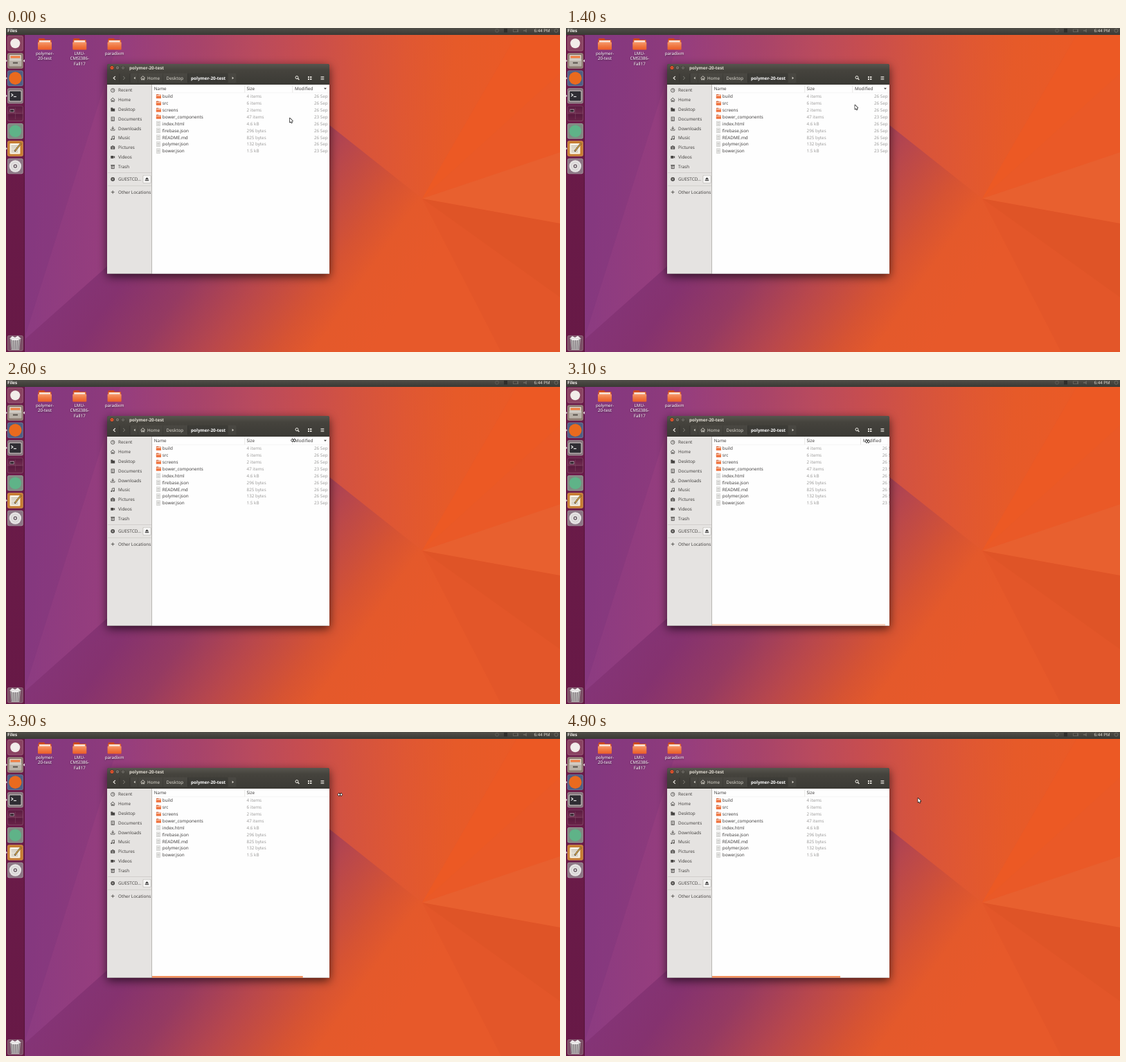
An HTML page with a canvas that plays this animation: 800x469 px, repeating every 5 s.

```html
<!DOCTYPE html>
<html lang="en">
<head>
<meta charset="utf-8">
<title>Desktop file manager</title>
<style>
  html, body { margin: 0; width: 800px; height: 469px; overflow: hidden; background: #3c3b37; }
  canvas { display: block; width: 800px; height: 469px; }
</style>
</head>
<body>
<canvas id="stage" width="800" height="469"></canvas>
<script>
const W = 800, H = 469, LOOP = 5000, STEP = 100;
const canvas = document.getElementById('stage');
const ctx = canvas.getContext('2d');
const dpr = window.devicePixelRatio || 1;
canvas.width = W * dpr;
canvas.height = H * dpr;
ctx.scale(dpr, dpr);

function rect(x, y, w, h, color) {
  ctx.fillStyle = color;
  ctx.fillRect(x, y, w, h);
}

function round(x, y, w, h, r, color) {
  ctx.beginPath();
  ctx.roundRect(x, y, w, h, r);
  ctx.fillStyle = color;
  ctx.fill();
}

function disc(x, y, r, color) {
  ctx.beginPath();
  ctx.arc(x, y, r, 0, Math.PI * 2);
  ctx.fillStyle = color;
  ctx.fill();
}

function ring(x, y, r, color, width = 0.8) {
  ctx.beginPath();
  ctx.arc(x, y, r, 0, Math.PI * 2);
  ctx.strokeStyle = color;
  ctx.lineWidth = width;
  ctx.stroke();
}

function path(points, close) {
  ctx.beginPath();
  points.forEach(([x, y]) => ctx.lineTo(x, y));
  if (close) ctx.closePath();
}

function poly(points, color) {
  path(points, true);
  ctx.fillStyle = color;
  ctx.fill();
}

function line(points, color, width = 0.8) {
  path(points);
  ctx.strokeStyle = color;
  ctx.lineWidth = width;
  ctx.stroke();
}

// y is the middle of the line of text
function text(s, x, y, color, { bold = false, align = 'left', size = 6.35 } = {}) {
  ctx.font = `${bold ? 700 : 400} ${size}px "Noto Sans", "Open Sans", sans-serif`;
  ctx.textRendering = 'geometricPrecision';
  ctx.textAlign = align;
  ctx.fillStyle = color;
  ctx.fillText(s, x, y + 2.2);
}

function gradient(x0, y0, x1, y1, stops) {
  const g = ctx.createLinearGradient(x0, y0, x1, y1);
  stops.forEach(([p, c]) => g.addColorStop(p, c));
  return g;
}

// Piecewise linear track: [time, value, value...]
function track(keys, t) {
  let i = 0;
  while (i < keys.length - 2 && t >= keys[i + 1][0]) i++;
  const [a, b] = [keys[i], keys[i + 1]];
  const k = Math.min(1, Math.max(0, (t - a[0]) / (b[0] - a[0])));
  return a.slice(1).map((v, j) => v + (b[j + 1] - v) * k);
}

// Facets meeting at one hub, over a dusky diagonal gradient
function wallpaper() {
  const hub = [601, 247];
  rect(0, 0, W, H, gradient(205, 143, 574, 399, [
    [0, '#84357a'], [0.22, '#85326f'], [0.39, '#953a62'], [0.57, '#b8474c'],
    [0.75, '#d65333'], [0.85, '#e4592b'], [1, '#e7592a']]));
  poly([[28, 450], [146, 345], [300, 200], [440, 119], hub, [737, 10], [28, 10]],
    gradient(28, 10, 737, 70, [
      [0, '#883a82'], [0.21, '#973e7d'], [0.36, '#a8446a'], [0.46, '#b84a5e'],
      [0.56, '#c64d50'], [0.67, '#d4533f'], [0.77, '#df5733'], [0.87, '#e65a29'],
      [1, '#ea5a26']]));
  poly([[28, 10], [165, 10], [28, 445]], 'rgba(105,45,115,.18)');
  poly([hub, [737, 10], [800, 10], [800, 66]], '#ec5924');
  poly([hub, [800, 66], [800, 180]], '#ea5927');
  poly([hub, [800, 180], [800, 283]], '#e8602f');
  poly([hub, [800, 283], [800, 390]], '#df5427');
  poly([hub, [800, 390], [800, 469], [715, 469]], '#e35629');
}

function folder(x, y, s) {
  ctx.save();
  ctx.translate(x, y);
  ctx.scale(s, s);
  round(1, 0, 9, 6, 1, '#c9481e');
  round(0.5, 2, 19, 13, 1, '#dc5a28');
  rect(2, 3, 16, 4, '#f8e4d8');
  round(0, 5.5, 20, 11, 1, gradient(0, 5.5, 0, 16, [[0, '#f7996c'], [0.5, '#f07a44'], [1, '#ec5f2b']]));
  ctx.restore();
}

function paper(x, y) {
  rect(x, y, 5.6, 7.4, '#c4c4c2');
  rect(x + 0.5, y + 0.5, 4.6, 6.4, '#f1f1ef');
  for (let i = 0; i < 4; i++) rect(x + 1.2, y + 1.5 + i * 1.3, 3.2, 0.6, '#b9b9b7');
}

function desktopIcons() {
  const labels = [['polymer-', '20-test'], ['LMU-', 'CMSI386-', 'Fall17'], ['paradixm']];
  labels.forEach((rows, i) => {
    const x = 56 + i * 50.3;
    folder(x - 10, 15, 1);
    ctx.save();
    ctx.shadowColor = 'rgba(0,0,0,.6)';
    ctx.shadowBlur = 2;
    ctx.shadowOffsetY = 0.7;
    rows.forEach((s, j) => text(s, x, 37 + j * 7.2, '#fff', { align: 'center', size: 6.2 }));
    ctx.restore();
  });
}

function panel() {
  rect(0, 0, W, 10, gradient(0, 0, 0, 10, [[0, '#504e48'], [1, '#3a3934']]));
  text('Files', 2, 3.6, '#f4f2ee', { bold: true });
  text('6:44 PM', 785.5, 3.6, '#dfdbd2', { align: 'right', size: 6.1 });
  const dim = '#65635c';
  ring(709, 3.8, 2.4, dim);
  rect(719, 1, 5, 5.5, '#2f2e2b');
  rect(732, 1.5, 8, 4.5, dim);
  rect(733, 2.3, 5, 2.8, '#45433e');
  poly([[747, 3], [749, 3], [752, 1], [752, 6.5], [749, 4.8], [747, 4.8]], dim);
  ring(794.5, 3.8, 2.5, '#77756d');
}

function tile(y, color) {
  round(2, y - 11.3, 22.8, 22.6, 2.5, color);
  ctx.beginPath();
  ctx.roundRect(2.4, y - 10.9, 22, 21.8, 2.2);
  ctx.strokeStyle = 'rgba(255,255,255,.22)';
  ctx.lineWidth = 0.7;
  ctx.stroke();
}

function launcher() {
  rect(0, 10, 27, H - 10, gradient(0, 10, 0, H, [[0, '#6c1c4a'], [1, '#671946']]));
  rect(26.4, 10, 0.6, H - 10, 'rgba(30,0,20,.4)');

  tile(22.2, '#8a4462');
  disc(13.3, 22.2, 7, '#f2ece9');

  tile(47.5, '#8d7a70');
  round(5, 39, 17, 7, 1, '#d9d2c8');
  rect(6.5, 40.5, 14, 3, '#f07a3c');
  round(4.5, 44.5, 18, 11, 1, '#b9b2a8');
  rect(5.2, 45.2, 16.6, 2, '#d8d3cb');
  rect(10, 49.5, 7, 2, '#5b554f');

  tile(72.8, '#4f5f86');
  disc(13.4, 72.8, 9.2, '#ea6a1e');

  tile(98.3, '#85747c');
  round(4.2, 90.4, 18.4, 16, 1.5, '#d4d0cc');
  round(5.2, 91.4, 16.4, 14, 1, '#2f2d33');
  line([[7.5, 95], [10, 97], [7.5, 99]], '#f2f2f2', 1.1);
  line([[11, 99.4], [15, 99.4]], '#f2f2f2', 1.1);

  tile(123.8, gradient(0, 113, 0, 135, [[0, '#5a1a3f'], [0.5, '#6f2c50'], [0.55, '#591a3e'], [1, '#6a2549']]));
  rect(13.2, 115.5, 0.6, 16.5, '#7b4560');
  rect(4.5, 123.4, 18, 0.6, '#7b4560');
  rect(5.5, 117.5, 6.5, 4.5, '#a08c97');
  rect(6.2, 118.6, 5, 2.6, '#2d2029');

  tile(149.2, '#828882');
  disc(13.4, 149.2, 8.8, '#5fb388');

  tile(174.5, '#c77d31');
  round(5.5, 167, 15, 15.5, 1, '#f5f0e2');
  for (let i = 0; i < 5; i++) rect(7.5, 170 + i * 2.3, 10, 0.7, '#a7a092');
  line([[12.5, 178.5], [22, 166.5]], '#55402c', 2.2);
  line([[13.2, 177.6], [22, 166.5]], '#e8b647', 1.1);

  tile(200, '#8c7785');
  disc(13.4, 200, 8.7, '#e6e4e3');
  ring(13.4, 200, 5.6, '#d6d3d4', 1.5);
  disc(13.4, 200, 2.7, '#6d5f68');
  disc(13.4, 200, 1.2, '#eeeeee');

  tile(456.2, '#7a4f65');
  poly([[6, 449], [21, 449], [19.3, 466], [7.7, 466]], '#b9b5b5');
  for (let i = 0; i < 5; i++) line([[7.5 + i * 3, 451], [8.6 + i * 2.4, 465]], '#726a70', 0.8);
  poly([[6, 449], [9, 446], [13, 448], [17, 445.5], [21, 449], [17, 452], [9, 452]], '#efeeee');
  line([[5.5, 449.5], [21.5, 449.5]], '#dedada', 1);

  poly([[27, 45.3], [24.8, 47.5], [27, 49.7]], '#e6dfe2');
  [47.5, 72.8, 98.3, 174.5].forEach(y => poly([[0, y - 1.8], [1.8, y], [0, y + 1.8]], '#e6dfe2'));
}

function titleBar() {
  ctx.save();
  ctx.shadowColor = 'rgba(0,0,0,.65)';
  ctx.shadowBlur = 14;
  ctx.shadowOffsetY = 4;
  round(146, 52, 321, 303.8, [3, 3, 0, 0], '#3c3b37');
  ctx.restore();
  round(146, 52, 321, 30, [3, 3, 0, 0],
    gradient(0, 52, 0, 82, [[0, '#57554e'], [0.3, '#45433d'], [1, '#3b3a35']]));

  disc(153, 57.5, 2.9, '#2f2d29');
  disc(153, 57.5, 2.5, '#ee5a32');
  line([[152, 56.5], [154, 58.5]], '#6b2412', 0.6);
  line([[154, 56.5], [152, 58.5]], '#6b2412', 0.6);
  [161, 169].forEach(x => { disc(x, 57.5, 2.8, '#33312d'); disc(x, 57.5, 2.3, '#7d7a72'); });
  rect(159.9, 57.2, 2.2, 0.6, '#33312d');
  ctx.strokeStyle = '#33312d';
  ctx.lineWidth = 0.5;
  ctx.strokeRect(168, 56.6, 2, 1.8);
  text('polymer-20-test', 178, 57.5, '#e2ddd3', { bold: true });

  const fg = '#dfdbd2';
  line([[157.8, 70], [155.2, 72.4], [157.8, 74.8]], '#f2efe8', 1.1);
  line([[169.2, 70], [171.8, 72.4], [169.2, 74.8]], '#85827a', 1);
  round(179.5, 65.5, 153, 14, 1.5, 'rgba(255,255,255,.035)');
  rect(163.6, 66, 0.6, 13, '#32312d');
  rect(178.6, 66, 0.6, 13, '#32312d');
  rect(262, 65.5, 58, 14, 'rgba(0,0,0,.16)');
  [190, 226, 262, 320].forEach(x => rect(x, 66, 0.5, 13, 'rgba(0,0,0,.22)'));
  poly([[186.6, 70.6], [184.6, 72.4], [186.6, 74.2]], fg);
  poly([[326.6, 70.6], [328.8, 72.4], [326.6, 74.2]], fg);
  house(197.7, 72.4, fg);
  text('Home', 204, 72.4, fg);
  text('Desktop', 231.5, 72.4, fg);
  text('polymer-20-test', 267, 72.4, '#fff', { bold: true });

  ring(420, 71.6, 2, '#f2efe8', 1);
  line([[421.4, 73], [423.4, 75]], '#f2efe8', 1.2);
  [70.2, 73.2].forEach(y => {
    rect(436, y, 2, 1.8, '#f2efe8');
    rect(439, y, 2.4, 1.8, '#f2efe8');
  });
  [70, 72, 74].forEach(y => rect(454.5, y, 4.8, 0.9, '#f2efe8'));
}

function house(x, y, color) {
  line([[x - 3.2, y + 0.2], [x, y - 2.8], [x + 3.2, y + 0.2]], color, 0.9);
  line([[x - 2, y], [x - 2, y + 2.6], [x - 0.6, y + 2.6], [x - 0.6, y + 0.8],
    [x + 0.6, y + 0.8], [x + 0.6, y + 2.6], [x + 2, y + 2.6], [x + 2, y]], color, 0.8);
}

const INK = '#454341';

const glyphs = {
  Recent(x, y) {
    ring(x, y, 2.7, INK);
    line([[x, y - 1.7], [x, y], [x + 1.5, y]], INK, 0.7);
  },
  Home(x, y) { house(x, y, INK); },
  Desktop(x, y) {
    rect(x - 2.8, y - 2.4, 2.8, 1.6, INK);
    rect(x - 2.8, y - 1.2, 5.8, 4, INK);
  },
  Documents(x, y) {
    ctx.strokeStyle = INK;
    ctx.lineWidth = 0.8;
    ctx.strokeRect(x - 2.1, y - 2.6, 4.2, 5.3);
    [-1, 0.2, 1.4].forEach(d => rect(x - 1.2, y + d, 2.4, 0.5, INK));
  },
  Downloads(x, y) {
    line([[x, y - 2.8], [x, y + 1]], INK, 1);
    line([[x - 1.8, y - 0.7], [x, y + 1.1], [x + 1.8, y - 0.7]], INK, 0.9);
    line([[x - 2.8, y + 1], [x - 2.8, y + 2.6], [x + 2.8, y + 2.6], [x + 2.8, y + 1]], INK, 0.8);
  },
  Music(x, y) {
    line([[x - 1, y + 1.8], [x - 1, y - 2.2], [x + 2.2, y - 2.7], [x + 2.2, y + 1.3]], INK, 0.8);
    disc(x - 1.8, y + 1.8, 1.1, INK);
    disc(x + 1.4, y + 1.4, 1.1, INK);
  },
  Pictures(x, y) {
    round(x - 3, y - 1.7, 6, 4.3, 0.7, INK);
    rect(x - 1.2, y - 2.6, 2.4, 1.2, INK);
    ring(x, y + 0.4, 1.2, '#e5e3e1', 0.7);
  },
  Videos(x, y) {
    rect(x - 2.9, y - 1.8, 4, 3.8, INK);
    poly([[x + 1, y], [x + 2.9, y - 1.7], [x + 2.9, y + 1.9]], INK);
  },
  Trash(x, y) {
    ctx.strokeStyle = INK;
    ctx.lineWidth = 0.8;
    ctx.strokeRect(x - 2, y - 1.5, 4, 4.4);
    rect(x - 2.9, y - 2.4, 5.8, 0.9, INK);
    [-0.8, 0.5].forEach(d => rect(x + d, y - 0.6, 0.5, 2.6, INK));
  }
};

function sidebar() {
  rect(146, 82, 64.5, 273.7, '#e5e3e1');
  rect(210.2, 82, 0.8, 273.7, '#c4c1be');
  Object.keys(glyphs).forEach((name, i) => {
    const y = 90.2 + i * 13.8;
    glyphs[name](154.2, y, INK);
    text(name, 162, y, INK);
  });
  rect(147, 209.3, 63, 0.7, '#cbc8c5');
  rect(147, 227.9, 63, 0.7, '#cbc8c5');
  disc(154.2, 218.8, 2.9, INK);
  ring(154.2, 218.8, 1, '#e5e3e1', 0.7);
  text('GUESTCD…', 162, 218.8, INK);
  round(197.6, 213, 11.8, 11.8, 1.6, '#b7b4b0');
  round(198.2, 213.6, 10.6, 10.6, 1.3, '#f6f5f4');
  poly([[203.5, 216.2], [206.2, 219.2], [200.8, 219.2]], '#333');
  rect(200.8, 220.1, 5.4, 1.1, '#333');
  line([[151.8, 237.6], [156.6, 237.6]], INK, 0.8);
  line([[154.2, 235.2], [154.2, 240]], INK, 0.8);
  text('Other Locations', 162, 237.6, INK, { size: 6.3 });
}

const files = [
  ['build', '4 items', 26], ['src', '6 items', 26], ['screens', '2 items', 26],
  ['bower_components', '47 items', 23], ['index.html', '4.6 kB', 26],
  ['firebase.json', '296 bytes', 26], ['README.md', '825 bytes', 26],
  ['polymer.json', '132 bytes', 26], ['bower.json', '1.5 kB', 23]
];

function listing(shift, extra) {
  const grey = '#9c9b9a', dark = '#434140', edge = 414 + shift;
  ctx.save();
  ctx.beginPath();
  ctx.rect(211, 82, 256, 273.7);
  ctx.clip();
  rect(211, 82, 256, 274, '#fefefe');
  rect(211, 93.6, 256, 0.5, '#ecebea');
  text('Name', 213.8, 87.8, dark);
  text('Size', 347.5, 87.8, dark);
  text('Modified', edge + 3, 87.8, dark);
  const tip = 461 + shift;
  poly([[tip - 2, 86.7], [tip + 2, 86.7], [tip, 89]], dark);
  [344.5, edge - 0.5].forEach(x => rect(x, 82.5, 0.7, 11, '#dddbd9'));
  files.forEach(([name, size, day], i) => {
    const y = 99 + i * 9.89;
    if (i < 4) folder(216.8, y - 3.1, 0.36);
    else paper(217.2, y - 3.8);
    text(name, 225.8, y, dark);
    text(size, 347.6, y, grey, { size: 6.25 });
    text(day + ' Sep', 464.6 + shift, y, grey, { align: 'right', size: 6.25 });
  });
  if (extra > 0) {
    ctx.globalAlpha = Math.min(1, 0.3 + extra / 55);
    rect(211, 353.4, 256 * 256 / (256 + extra), 2.3, '#ef7a3d');
  }
  ctx.restore();
}

// White pointer shape with a dark outline
function outlined(points, width) {
  path(points, true);
  ctx.lineJoin = 'round';
  ctx.strokeStyle = '#111';
  ctx.lineWidth = width;
  ctx.stroke();
  ctx.fillStyle = '#fff';
  ctx.fill();
  ctx.lineJoin = 'miter';
}

function arrow(x, y) {
  const shape = [[0, 0], [0, 6], [1.4, 4.8], [2.3, 6.8], [3.3, 6.3], [2.4, 4.4], [4.2, 4.2]];
  outlined(shape.map(([a, b]) => [x + a, y + b]), 1.3);
}

function resizer(x, y) {
  [-1, 1].forEach(d => outlined([[x + d * 3.2, y], [x + d * 1.3, y - 2.1], [x + d * 1.3, y - 0.6],
    [x + d * 0.4, y - 0.6], [x + d * 0.4, y + 0.6], [x + d * 1.3, y + 0.6], [x + d * 1.3, y + 2.1]], 1.2));
}

const pointer = [[0, 409.8, 130.5], [300, 409.8, 129], [600, 410.3, 121.5], [1400, 417.3, 111.5],
  [2200, 415.5, 90], [2600, 415, 87.3], [2750, 415, 87.5], [3500, 458.8, 90.3],
  [4300, 506, 90.8], [4600, 508, 92], [4900, 508.3, 95.8], [5000, 508.3, 95.8]];
const columnShift = [[0, 0], [2900, 0], [3500, 35], [4300, 78], [4900, 98]];
const overflow = [[0, 0], [2950, 0], [3500, 22], [4300, 68], [4900, 98]];

function draw(t) {
  wallpaper();
  desktopIcons();
  launcher();
  panel();
  titleBar();
  sidebar();
  listing(track(columnShift, t)[0], track(overflow, t)[0]);
  const [x, y] = track(pointer, t);
  if (t >= 2200 && t < 4600) resizer(x, y);
  else arrow(x, y);
}

let shown = -1;
function tick() {
  const t = Math.floor(performance.now() % LOOP / STEP) * STEP;
  if (t !== shown) draw(shown = t);
  requestAnimationFrame(tick);
}
tick();
</script>
</body>
</html>
```
